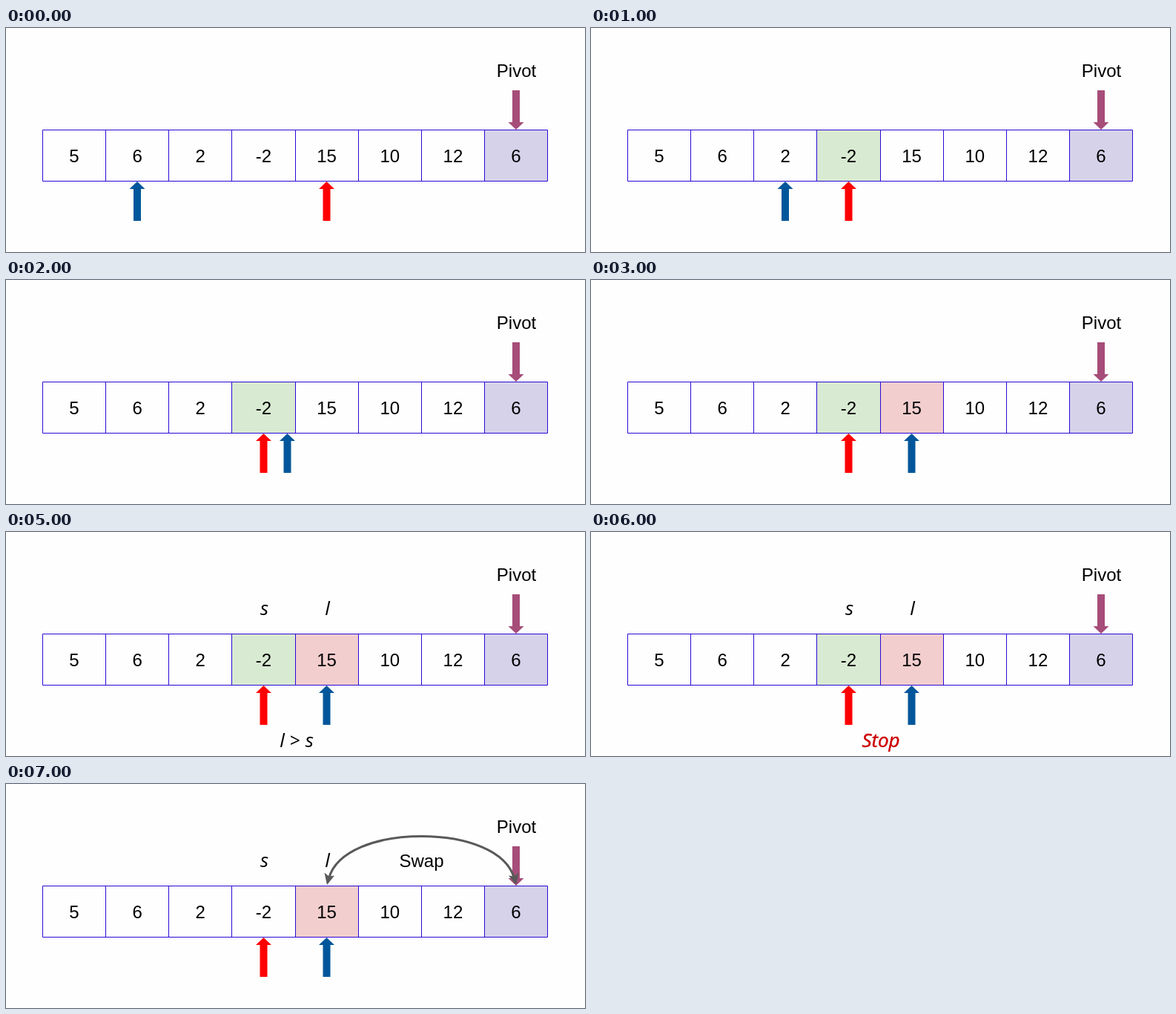
An HTML page that plays this animation: 781 by 302 pixels, repeating every 8000 ms.

```html
<!DOCTYPE html>
<html lang="en">
<head>
<meta charset="utf-8">
<title>Partition step</title>
<style>
  html, body { margin: 0; width: 100%; height: 100%; overflow: hidden; background: #fdfefd; }
  svg { display: block; width: 781px; height: 302px; }
  text { font: 24px "Liberation Sans", Arial, sans-serif; text-anchor: middle; }
  .math { font: italic 26px "Open Sans", "Noto Sans", sans-serif; }
  .stop { fill: #c00; stroke: #c00; stroke-width: .45px; }
  .grid { fill: none; stroke: #2a08d8; }
</style>
</head>
<body>
<svg viewBox="0 0 781 302">
  <defs>
    <path id="arrow" d="M0 207 10.5 217H5V260H-5V217H-10.5Z"/>
    <path id="head" d="M433 136 429.5 119.5 435.5 124.5 443 123.5Z"/>
  </defs>
  <rect id="small" x="304.5" y="137.5" width="86" height="69" fill="#d9ead2"/>
  <rect id="large" x="390.5" y="137.5" width="85" height="69" fill="#f2cecf"/>
  <rect x="645.5" y="137.5" width="85" height="69" fill="#d6d2e9"/>
  <path class="grid" d="M49.5 137.5H730.5V206.5H49.5ZM134.5 137.5V206.5M219.5 137.5V206.5M304.5 137.5V206.5M390.5 137.5V206.5M475.5 137.5V206.5M560.5 137.5V206.5M645.5 137.5V206.5"/>
  <g id="values"></g>
  <text x="688.5" y="66">Pivot</text>
  <use href="#arrow" fill="#a64d79" transform="translate(688 344) scale(1 -1)"/>
  <use id="red" href="#arrow" fill="#f00"/>
  <use id="blue" href="#arrow" fill="#00569b"/>
  <g id="labels">
    <text class="math" x="348.5" y="111.5">s</text>
    <text class="math" x="433.5" y="111.5">l</text>
  </g>
  <text id="test" class="math" x="392" y="289.5">l &gt; s</text>
  <text id="stop" class="math stop" x="391" y="289.5">Stop</text>
  <g id="swap">
    <path d="M435.5 127C446 90 500 70.5 560.5 70.5S675 90 685.5 127" fill="none" stroke="#595959" stroke-width="3"/>
    <use href="#head" fill="#595959"/>
    <use href="#head" fill="#595959" transform="translate(1121) scale(-1 1)"/>
    <text x="560.5" y="112">Swap</text>
  </g>
</svg>
<script>
  const $ = id => document.getElementById(id);
  const STEP = 1000, STEPS = 8;
  const redX = [432.5, 347.5];
  const blueX = [177, 262, 379.5, 432.5];

  $('values').innerHTML = [5, 6, 2, -2, 15, 10, 12, 6]
    .map((n, i) => `<text x="${92 + i * 85.15}" y="181">${n}</text>`).join('');

  const at = (list, i) => list[Math.min(i, list.length - 1)];
  const place = (id, x) => $(id).setAttribute('transform', `translate(${x})`);
  const show = (id, on) => { $(id).style.display = on ? '' : 'none'; };

  function draw(step) {
    place('red', at(redX, step));
    place('blue', at(blueX, step));
    show('small', step >= 1 && step < 7);
    show('large', step >= 3);
    show('labels', step >= 4);
    show('test', step === 5);
    show('stop', step === 6);
    show('swap', step === 7);
  }

  let last = -1;
  function tick() {
    const step = Math.floor(performance.now() / STEP) % STEPS;
    if (step !== last) draw(last = step);
    requestAnimationFrame(tick);
  }
  tick();
</script>
</body>
</html>
```
